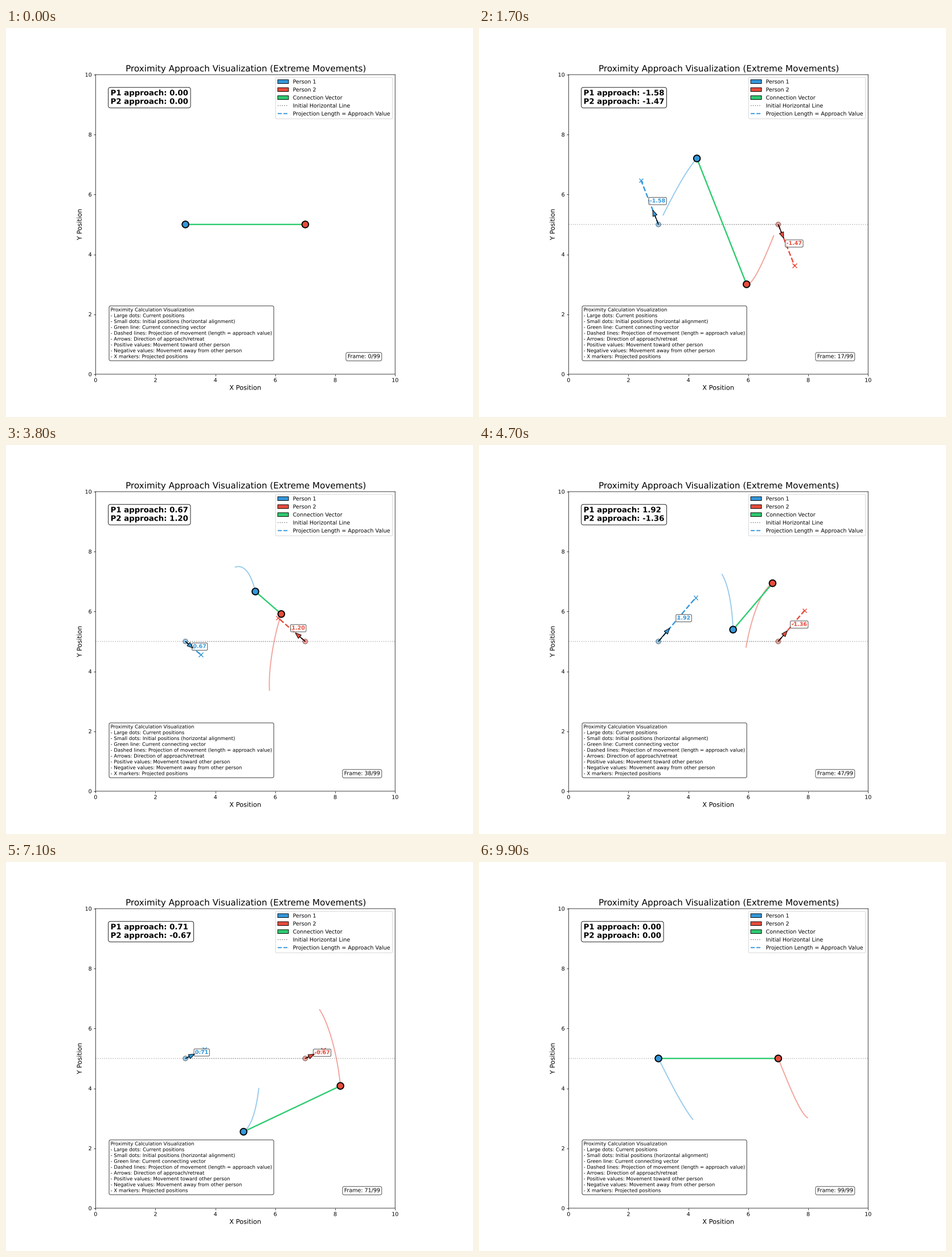
Write a matplotlib script that moves like this. It is 820 by 683 pixels and loops after 10 s.

```python
import numpy as np
import matplotlib.pyplot as plt
from matplotlib.animation import FuncAnimation
from matplotlib.lines import Line2D
from matplotlib.patches import Patch
from matplotlib.patheffects import Normal

W, H = 820, 683
DPI = W / 12
FRAMES, TRAIL = 100, 15
BLUE, RED, GREEN = "#3498db", "#e74c3c", "#2ecc71"

# Path effects draw text as outlines, placed at subpixel positions.
plt.rcParams.update({
    "font.family": "DejaVu Sans",
    "path.snap": False,
    "path.effects": [Normal()],
})

t = np.linspace(0, 2 * np.pi, FRAMES)
path1 = np.column_stack([3 + 2.5 * np.sin(t / 2), 5 + 2.5 * np.sin(t)])
path2 = np.column_stack([7 - 1.2 * np.sin(t), 5 - 2 * np.sin(1.5 * t)])

fig, ax = plt.subplots(figsize=(12, (H + 0.001) / DPI), dpi=DPI)
ax.set(xlim=(0, 10), ylim=(0, 10), aspect="equal")
ax.set_title("Proximity Approach Visualization (Extreme Movements)", fontsize=16)
ax.set_xlabel("X Position", fontsize=12)
ax.set_ylabel("Y Position", fontsize=12)


def box(alpha, pad=0.3):
    return dict(boxstyle=f"round,pad={pad}", facecolor="white", alpha=alpha)


class Person:
    def __init__(self, path, color):
        self.path, self.start = path, path[0]
        x, y = self.start
        self.trail, = ax.plot([], [], color=color, lw=2, alpha=0.5, zorder=2)
        ax.plot(x, y, "o", ms=9, mfc=color, mec="black", mew=1, alpha=0.5, zorder=2)
        self.proj, = ax.plot([], [], "--", color=color, lw=2.5, zorder=2.2)
        self.cross, = ax.plot([], [], "x", color=color, ms=8, mew=1.5, zorder=2.3)
        self.dot, = ax.plot([], [], "o", ms=12.25, mfc=color, mec="black",
                            mew=2, zorder=2.8)
        self.label = ax.text(0, 0, "", fontsize=10, color=color, weight="bold",
                             bbox=box(0.7, 0.2), zorder=3)
        self.arrow = ax.arrow(x, y, 0.1, 0, head_width=0.15, head_length=0.2,
                              fc=color, ec="black", zorder=4)

    def update(self, i, unit, sign):
        """Draw the pose at step i and return the approach value."""
        pos = self.path[i]
        value = (pos - self.start) @ unit * sign
        shift = value * sign * unit
        end, mid = self.start + shift, self.start + shift / 2
        self.trail.set_data(*self.path[max(0, i - TRAIL):i + 1].T)
        self.dot.set_data(*pos[:, None])
        self.proj.set_data(*np.array([self.start, end]).T)
        self.cross.set_data(*end[:, None])
        self.label.set_position(mid)
        self.label.set_text(f"{value:.2f}")
        moved = abs(value) > 0.01
        for part in (self.proj, self.cross, self.label, self.arrow):
            part.set_visible(moved)
        if moved:
            self.arrow.set_data(dx=0.2 * shift[0], dy=0.2 * shift[1])
        return round(value, 2) + 0.0


dotted = dict(color="gray", ls=":", lw=1.5, alpha=0.6, zorder=1.5)
level = ax.axhline(5, **dotted)
ax.plot([3, 7], [5, 5], **dotted)
link, = ax.plot([], [], color=GREEN, lw=2.5, zorder=2.5)
person1, person2 = Person(path1, BLUE), Person(path2, RED)

values = ax.text(0.05, 0.95, "", transform=ax.transAxes, fontsize=14,
                 weight="bold", va="top", bbox=box(0.9))
counter = ax.text(0.95, 0.05, "", transform=ax.transAxes, fontsize=10,
                  ha="right", va="bottom", bbox=box(0.7))
ax.text(0.05, 0.05, "\n".join([
    "Proximity Calculation Visualization",
    "- Large dots: Current positions",
    "- Small dots: Initial positions (horizontal alignment)",
    "- Green line: Current connecting vector",
    "- Dashed lines: Projection of movement (length = approach value)",
    "- Arrows: Direction of approach/retreat",
    "- Positive values: Movement toward other person",
    "- Negative values: Movement away from other person",
    "- X markers: Projected positions",
]), transform=ax.transAxes, fontsize=9, va="bottom", linespacing=1.18,
    bbox=box(0.8))

ax.legend(handles=[
    Patch(fc=BLUE, ec="black", label="Person 1"),
    Patch(fc=RED, ec="black", label="Person 2"),
    Patch(fc=GREEN, ec="black", label="Connection Vector"),
    Line2D([], [], color="gray", ls=":", label="Initial Horizontal Line"),
    Line2D([], [], color=BLUE, ls="--", lw=2,
           label="Projection Length = Approach Value"),
], loc="upper right", fontsize=10, labelspacing=0.53)


def update(i):
    gap = path2[i] - path1[i]
    unit = gap / np.hypot(*gap)
    a1 = person1.update(i, unit, 1)
    a2 = person2.update(i, unit, -1)
    link.set_data(*np.array([path1[i], path2[i]]).T)
    level.set_visible(i > 0)
    values.set_text(f"P1 approach: {a1:.2f}\nP2 approach: {a2:.2f}")
    counter.set_text(f"Frame: {i}/{FRAMES - 1}")
    return []


anim = FuncAnimation(fig, update, frames=FRAMES, interval=100,
                     init_func=lambda: [], repeat=True, repeat_delay=0)
plt.show()
```
